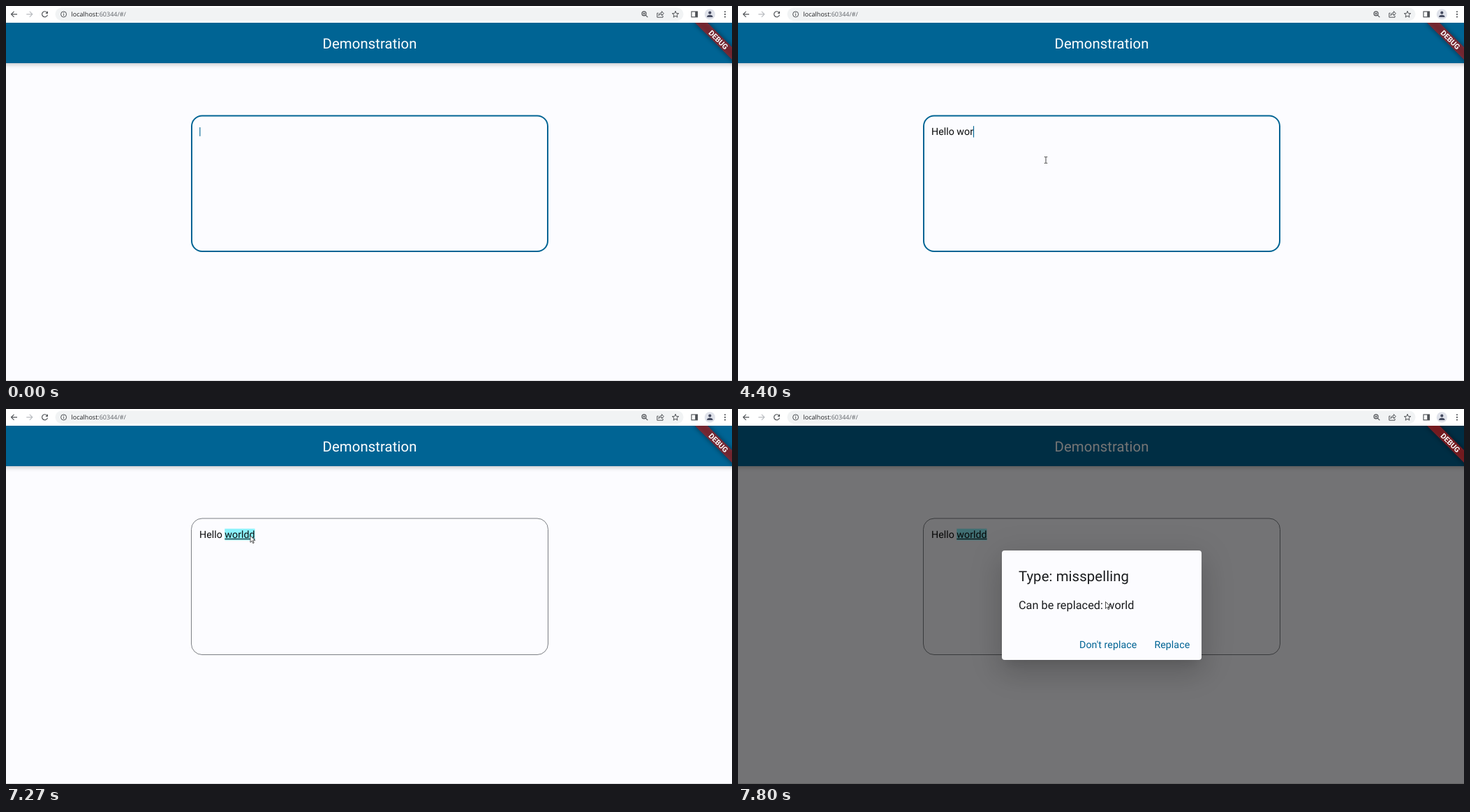
These frames come from a looping animation (1040 by 538 pixels, 8 s). An HTML page:

```html
<!DOCTYPE html>
<html lang="en">
<head>
<meta charset="utf-8">
<title>Demonstration</title>
<style>
  html, body { margin: 0; width: 100%; height: 100%; overflow: hidden; background: #fcfcff; }
  body { position: relative; }
  svg { position: absolute; left: 0; top: 0; display: block; }
  text {
    font-family: Roboto, sans-serif;
    text-rendering: geometricPrecision;
    white-space: pre;
  }
  .bar { fill: #006494; filter: drop-shadow(0 2px 3px rgba(0, 0, 0, .22)); }
  .title { font-size: 20.36px; letter-spacing: .08px; }
  .entry { font-size: 14.25px; fill: #0b0c0d; }
  .content { font-size: 16.29px; letter-spacing: .04px; }
  .action { font-size: 14.25px; letter-spacing: .04px; fill: #006494; }
  .url { font-family: "Open Sans", sans-serif; font-size: 9px; fill: #5f6368; }
  .icon { fill: none; stroke: #4f5256; stroke-width: 1.15; }
  .solid { fill: #4f5256; stroke: none; }
  .thin { stroke-width: 1; }

  .focused, .idle, .barrier, .dialog { animation: 8s infinite; }
  .focused { fill: none; stroke: #006494; stroke-width: 2; animation-name: blur; }
  .idle { fill: none; stroke: #7c7f84; stroke-width: 1; opacity: 0; animation-name: rest; }
  .barrier {
    position: absolute; left: 0; top: 24px; width: 1040px; height: 514px;
    background: rgba(0, 0, 0, .54); opacity: 0;
    animation-name: dim; animation-timing-function: step-end;
  }
  .dialog {
    position: absolute; left: 0; top: 0; width: 1040px; height: 538px; opacity: 0;
    animation-name: open; animation-timing-function: step-end;
  }
  .card {
    position: absolute; left: 378px; top: 203px; width: 286px; height: 157px;
    border-radius: 4px; background: #fcfcff;
    box-shadow: 0 11px 15px -7px rgba(0, 0, 0, .1),
                0 20px 40px 3px rgba(0, 0, 0, .1),
                0 9px 46px 8px rgba(0, 0, 0, .09);
  }
  @keyframes blur { 0%, 79.875% { opacity: 1 } 81.625%, 100% { opacity: 0 } }
  @keyframes rest { 0%, 79.875% { opacity: 0 } 81.625%, 100% { opacity: 1 } }
  @keyframes dim  { 0% { opacity: 0 } 91.875% { opacity: .85 } 92.75%, 100% { opacity: 1 } }
  @keyframes open { 0% { opacity: 0 } 91.875% { opacity: .757 } 92.75%, 100% { opacity: 1 } }
</style>
</head>
<body>

<svg width="1040" height="538" viewBox="0 0 1040 538">
  <rect width="1040" height="538" fill="#fcfcff"/>
  <rect y="537" width="1040" height="1" fill="#d8d8db"/>
  <rect class="bar" x="-20" y="24" width="1080" height="58"/>
  <text class="title" x="521" y="61.3" text-anchor="middle" fill="#fff">Demonstration</text>

  <rect class="idle" x="265.5" y="157" width="511" height="195.5" rx="15.5"/>
  <rect class="focused" x="266" y="157.5" width="510" height="194.5" rx="15"/>

  <rect id="cyan" y="171.7" height="16.7" fill="#8bf2fb"/>
  <rect id="yellow" y="171.7" height="16.7" fill="#ffeca0"/>
  <text id="ruler" class="entry" x="277" y="185.3" visibility="hidden">Hello worldd</text>
  <text id="entry" class="entry" x="277" y="185.3"></text>
  <rect id="line" y="186" height="1" fill="#0b0c0d"/>
  <rect id="caret" width="1.1" fill="#006494"/>
</svg>

<div class="barrier"></div>

<div class="dialog">
  <div class="card"></div>
  <svg width="1040" height="538" viewBox="0 0 1040 538" fill="#1a1c1e">
    <text class="title" x="401.9" y="246.9">Type: misspelling</text>
    <text class="content" x="401.9" y="286.8">Can be replaced: world</text>
    <text class="action" x="489" y="343.3">Don't replace</text>
    <text class="action" x="596.4" y="343.3">Replace</text>
  </svg>
</div>

<svg width="1040" height="538" viewBox="0 0 1040 538">
  <defs>
    <clipPath id="page"><rect y="24" width="1040" height="514"/></clipPath>
    <filter id="soft" x="-30%" y="-150%" width="160%" height="400%">
      <feGaussianBlur stdDeviation="3.5"/>
    </filter>
  </defs>

  <!-- corner ribbon -->
  <g clip-path="url(#page)">
    <g transform="translate(1020.5 48.5) rotate(45)">
      <rect x="-42" y="-6.4" width="84" height="12.8" fill="#000" opacity=".5" filter="url(#soft)"/>
      <rect x="-60" y="-6.4" width="120" height="12.8" fill="#b71c1c" opacity=".627"/>
      <text y="3.8" font-size="10.6" font-weight="700" text-anchor="middle" fill="#fff">DEBUG</text>
    </g>
  </g>

  <!-- browser toolbar -->
  <rect width="1040" height="24" fill="#fff"/>
  <rect x="70.5" y="2.5" width="900" height="18.5" rx="9.25" fill="#f1f3f4"/>
  <text class="url" x="93.6" y="15.2"><tspan fill="#202124">localhost</tspan>:60344/#/</text>
  <g class="icon">
    <path d="M16 11.8H7.6M11.5 7.8l-4 4l4 4"/>
    <path d="M29.3 11.8h8.4M33.8 7.8l4 4l-4 4" stroke="#b9bcc0"/>
    <path d="M58.6 9.1A4 4 0 1 0 59.5 12.6"/>
    <path class="solid" d="M60 7.3v3.6h-3.6z"/>
    <circle class="thin" cx="82.6" cy="11.9" r="4"/>
    <path class="thin" d="M82.6 11.4v2.6M82.6 9.4v1.1"/>
    <circle cx="914" cy="10.9" r="3"/>
    <path d="M916.2 13.1l3.1 3.1M912.5 10.9h3M914 9.4v3"/>
    <path class="thin" d="M934.6 10.2h-1.8v6h8.2v-2.4M934.8 13.6c.5-2.8 2.3-4 4.6-4v-2l2.9 3.1l-2.9 3v-2c-1.9 0-3.3.4-4.6 1.9z"/>
    <path class="thin" id="star"/>
    <rect x="982" y="8" width="8.4" height="7.8"/>
    <path class="solid" d="M987.2 8h3.2v7.8h-3.2z"/>
    <path d="M1030 8.2v0M1030 11.9v0M1030 15.6v0" stroke-width="2.1" stroke-linecap="round"/>
  </g>
  <circle cx="1008.3" cy="11.9" r="7.6" fill="#dfe2ea"/>
  <g fill="#454b60">
    <circle cx="1008.3" cy="9.7" r="2.1"/>
    <path d="M1004.2 16v-1c0-1.6 2.7-2.3 4.1-2.3s4.1.7 4.1 2.3v1z"/>
  </g>

  <!-- pointer -->
  <g id="pointer">
    <path id="beam" d="M-2.2-4.5H-.5L0-4L.5-4.5H2.2M0-4V4M-2.2 4.5H-.5L0 4L.5 4.5H2.2" fill="none" stroke="#333" stroke-width=".9"/>
    <path id="arrow" d="M0 0V16.5L3.8 12.8L6.3 18.6L8.8 17.6L6.3 12H11.5Z" transform="scale(.6)" fill="#fff" stroke="#222" stroke-width="1.3"/>
  </g>
</svg>

<script>
  const LOOP = 8000;
  const BLINK = 490;      // caret half period
  const BLUR = 6390;      // field loses focus
  const ENTER = 190;      // pointer comes in
  const HOVER = 6940;     // pointer reaches the marked word

  const $ = id => document.getElementById(id);
  const phrase = $('ruler').textContent;

  // one time per letter of the phrase
  const keys = [1470, 1740, 1890, 2020, 2220, 2420, 3080, 3280, 3410, 4730, 4800, 5000];

  // spell check replies
  const marks = [
    { at: 2220, until: 2420, from: 0, to: 3 },
    { at: 4730, until: 5000, from: 6, to: 9 },
    { at: 5000, until: 5860, from: 6, to: 10 },
    { at: 5860, until: LOOP, from: 6, to: 12 },
    { at: 5460, until: 5860, from: 10, to: 12, color: 'yellow' }
  ];

  // pointer strokes; each leads on from the one before
  const home = { x: 965, y: 508 };
  const strokes = [
    { at: ENTER, end: 470, x: 446, y: 224 },
    { at: 620, end: 820, x: 441, y: 221 },
    { at: 5420, end: 5660, x: 448.5, y: 218 },
    { at: 5680, end: 5990, x: 443, y: 129 },
    { at: 6270, end: 6460, x: 438, y: 120 },
    { at: 6460, end: 7070, x: 350, y: 181.5 },
    { at: 7420, end: 7780, x: 526.5, y: 276.5 }
  ];

  const edges = [277];
  for (let i = 0; i < phrase.length; i++) edges.push($('ruler').getEndPositionOfChar(i).x);

  const set = (id, attrs) => {
    for (const key in attrs) $(id).setAttribute(key, attrs[key]);
  };
  const show = (id, on) => set(id, { visibility: on ? 'visible' : 'hidden' });
  const span = (id, from, to) => set(id, { x: edges[from], width: edges[to] - edges[from] });
  const smooth = p => p * p * (3 - 2 * p);

  function drawStar() {
    const points = Array.from({ length: 10 }, (_, i) => {
      const a = i * Math.PI / 5, r = i % 2 ? 2.1 : 4.9;
      return (959 + r * Math.sin(a)).toFixed(2) + ' ' + (12.2 - r * Math.cos(a)).toFixed(2);
    });
    set('star', { d: 'M' + points.join('L') + 'Z' });
  }

  function drawText(t) {
    const count = keys.filter(key => key <= t).length;
    $('entry').textContent = phrase.slice(0, count);

    // every key press restarts the blinking
    const last = count ? keys[count - 1] : 330 - BLINK;
    show('caret', t < BLUR && Math.floor((t - last) / BLINK) % 2 === 0);
    set('caret', count
      ? { x: edges[count], y: 172.2, height: 16.3 }
      : { x: 277.3, y: 174, height: 12.8 });
  }

  function drawMarks(t) {
    const live = marks.filter(m => m.at <= t && t < m.until);
    for (const id of ['cyan', 'yellow']) {
      const { from, to } = live.find(m => (m.color ?? 'cyan') === id) ?? { from: 0, to: 0 };
      span(id, from, to);
    }
    const from = live.length ? Math.min(...live.map(m => m.from)) : 0;
    span('line', from, Math.max(from, ...live.map(m => m.to)));
  }

  function drawPointer(t) {
    let { x, y } = home;
    for (const s of strokes) {
      const p = smooth(Math.min(1, Math.max(0, (t - s.at) / (s.end - s.at))));
      x += (s.x - x) * p;
      y += (s.y - y) * p;
    }
    const inField = x > 265 && x < 777 && y > 157 && y < 353;
    const beam = inField && t < HOVER;
    set('pointer', { transform: `translate(${x} ${y})` });
    show('beam', beam && t >= ENTER);
    show('arrow', !beam && t >= ENTER);
  }

  function draw(t) {
    drawText(t);
    drawMarks(t);
    drawPointer(t);
  }

  let start;
  function frame(now) {
    start ??= now;
    draw((now - start) % LOOP);
    requestAnimationFrame(frame);
  }

  drawStar();
  draw(0);
  requestAnimationFrame(frame);
</script>
</body>
</html>
```
